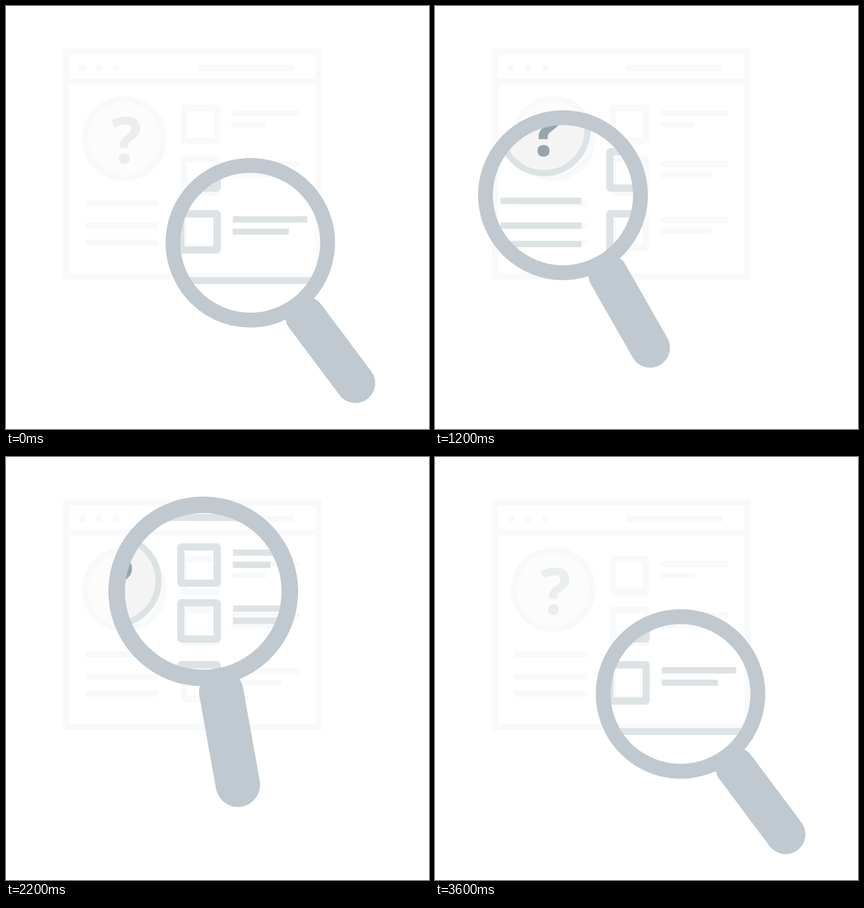
Recreate the animation shown at these times as an HTML page. Size 640 by 640 pixels, loop 6 s.

```html
<!DOCTYPE html>
<html lang="en">
<head>
<meta charset="utf-8">
<title>Searching a page</title>
<style>
  html, body { margin: 0; width: 100%; height: 100%; overflow: hidden; background: #fff; }
  svg { display: block; width: 100vw; height: 100vh; }
  .art { fill: none; stroke: #dde3e5; stroke-width: 9.5; }
  .page { opacity: .18; }
  .disc { fill: #f4f4f4; }
  text { fill: #95a5ac; stroke: none; font: 700 96px "Open Sans", "Noto Sans", sans-serif; }
  .zoomed text { font-size: 106px; }
  .zoomed .frame { stroke-width: 10.5; }
  .glass { fill: none; stroke: #c0c8d0; }
</style>
</head>
<body>
<svg viewBox="0 0 640 640">
  <defs>
    <clipPath id="lens"><circle id="hole" r="117"/></clipPath>
    <rect id="box" width="50" height="50" rx="1" stroke-width="10"/>
    <rect id="bigBox" width="55" height="55" rx="1" stroke-width="11"/>
  </defs>

  <g class="art page">
    <path class="frame" d="M91 69H473V409H91zM96 114H468"/>
    <path d="M110.5 93.5h9.5m16 0h9.5m16.500 0h9.500M290 93.500h145"/>
    <circle class="disc" cx="179" cy="200.500" r="59.500"/>
    <text x="159.500" y="237.800">?</text>
    <path d="M119.500 298.500h111m-111 34h111m-111 25.500h111"/>
    <use href="#box" x="269.200" y="154.300"/>
    <use href="#box" x="269.200" y="231.200"/>
    <use href="#box" x="269.200" y="316"/>
    <path stroke-width="8.700" d="M341 161.800h103m-103 17.800h52M341 239.200h103m-103 16.800h77M341 324.200h103m-103 17h77"/>
  </g>

  <g clip-path="url(#lens)">
    <g class="art zoomed">
      <path class="frame" d="M67.500 91.500V415.500H488V91.500z"/>
      <circle class="disc" cx="165" cy="187.200" r="65.700"/>
      <text x="142.500" y="227.300">?</text>
      <path d="M99 294.800h122.500m-122.500 37.500h122.500m-122.500 28h122.500"/>
      <use href="#bigBox" x="264.500" y="136"/>
      <use href="#bigBox" x="264.500" y="220.500"/>
      <use href="#bigBox" x="264.500" y="314.300"/>
      <path d="M343.500 144.800h112.500m-112.500 18.500h56.500M343.500 229.200h112.500m-112.500 18.500h84.500M343.500 322.800h112.500m-112.500 18.700h84.500"/>
    </g>
  </g>

  <g id="glass" class="glass">
    <circle r="117" stroke-width="22.400"/>
    <path d="M0 138V265.300" stroke-width="60" stroke-linecap="round"/>
  </g>
</svg>
<script>
  const LOOP = 6000, END = 3600, STEP = 50;
  const glass = document.getElementById('glass');
  const hole = document.getElementById('hole');

  // Each leg follows one Bezier curve; a lead below 1 gives a quicker start.
  const legs = [
    { from: -45, to: 700, lead: 1, x: [371.5, 312, 252, 192], y: [358.5, 349, 301, 333] },
    { from: 700, to: 930, lead: 1, x: [192, 192, 192, 192], y: [333, 339, 346, 352] },
    { from: 930, to: 1810, lead: .67, x: [192, 197, 192, 186.5], y: [352, 301, 250, 199] },
    { from: 1810, to: 2710, lead: 1, x: [186.5, 300, 344, 459], y: [199, 230, 165, 211] },
    { from: 2710, to: END, lead: 1, x: [459, 423, 393, 371.5], y: [211, 289, 318, 358.5] }
  ];

  function ease(t, from, to, lead = 1) {
    const u = Math.min(1, Math.max(0, (t - from) / (to - from))) ** lead;
    return u * u * (3 - 2 * u);
  }

  function bezier([a, b, c, d], s) {
    const r = 1 - s;
    return a * r * r * r + 3 * b * r * r * s + 3 * c * r * s * s + d * s * s * s;
  }

  function draw(t) {
    const leg = legs.find(l => t <= l.to);
    const s = ease(t, leg.from, leg.to, leg.lead);
    const place = `translate(${bezier(leg.x, s)} ${bezier(leg.y, s)})`;
    const scale = 1 + .12 * (ease(t, 1150, 1760) - ease(t, 2640, END));
    const tilt = 36.8 - 26.8 * (ease(t, 790, 2005) - ease(t, 2140, 3530));
    glass.setAttribute('transform', `${place} rotate(${-tilt}) scale(${scale})`);
    hole.setAttribute('transform', `${place} scale(${scale})`);
  }

  const start = performance.now();
  function tick() {
    const t = (performance.now() - start) % LOOP;
    draw(Math.min(Math.floor(t / STEP) * STEP, END));
    requestAnimationFrame(tick);
  }
  tick();
</script>
</body>
</html>
```
